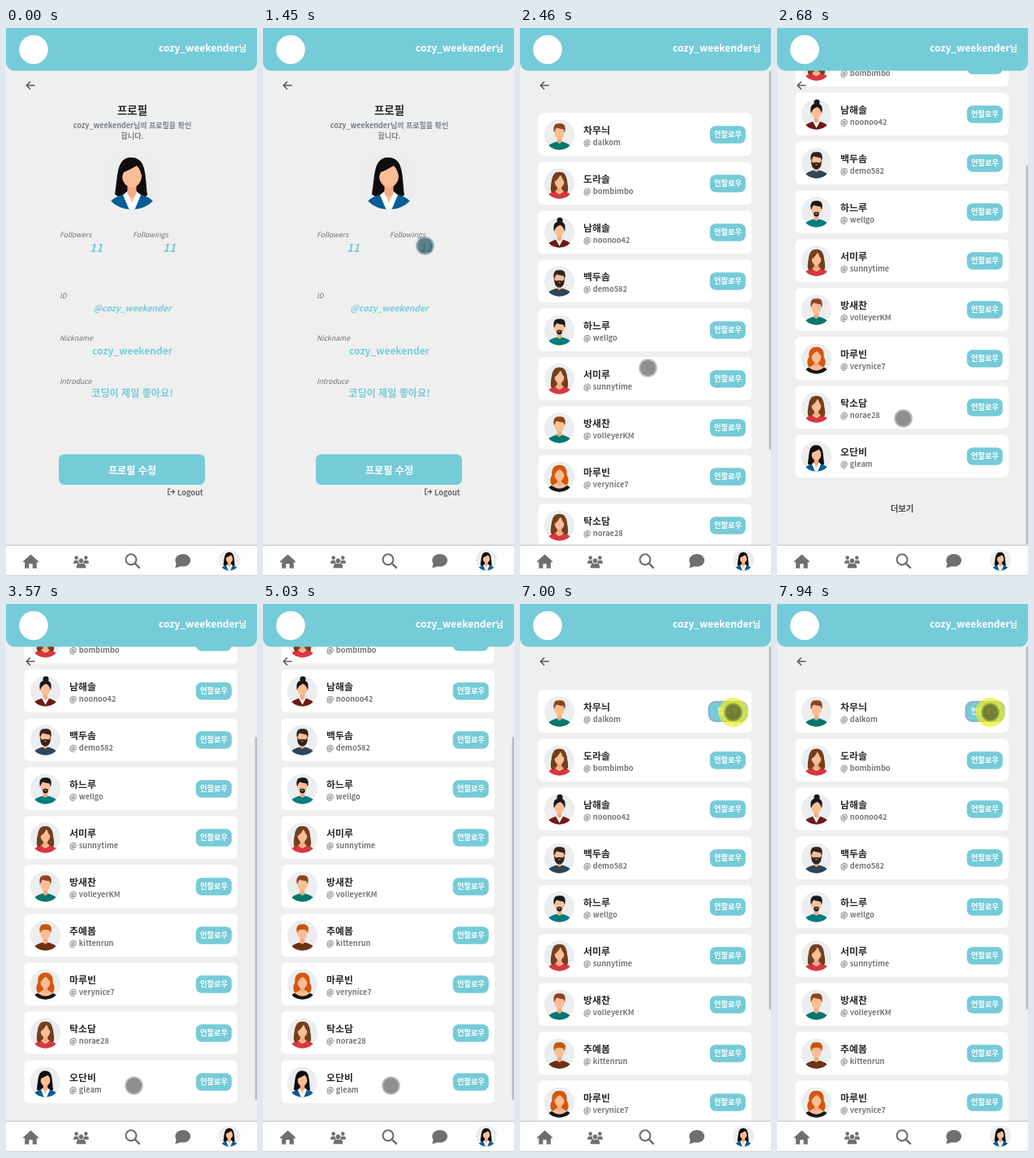
Recreate the animation shown at these times as an HTML page. Size 309 by 673 pixels, loop 8 s.

```html
<!DOCTYPE html>
<html lang="ko">
<head>
<meta charset="utf-8">
<title>Profile and followings</title>
<style>
  html, body { margin: 0; width: 100%; height: 100%; overflow: hidden; background: #efefef; }
  svg { display: block; width: 100%; height: 100%; }
  text { font-family: 'Noto Sans CJK KR', 'Noto Sans KR', 'Noto Sans CJK', 'Noto Sans CJK JP', 'Noto Sans', sans-serif; white-space: pre; }
  .mid { text-anchor: middle; }
  .bold { font-weight: 700; }
  .label { font-size: 8.7px; font-style: italic; fill: #707070; }
  .value { font-weight: 700; fill: #76cbd8; text-anchor: middle; }
  .slant { font-style: italic; }
</style>
</head>
<body>
<svg id="stage" viewBox="0 0 309 673" xmlns="http://www.w3.org/2000/svg"></svg>
<script>
const LOOP = 8000;
const TEAL = '#76cbd8', GREY = '#6f6f6f', SKIN = '#fbbd94', SHADE = '#f3ab82';
const USER = 'cozy_weekender';
const PITCH = 60, FIRST = 105.5, VIEW = 581;

// name, handle, avatar kind; the "late" one arrives with the second load
const people = [
  ['차무늬', 'dalkom', 'man'],
  ['도라솔', 'bombimbo', 'long'],
  ['남해솔', 'noonoo42', 'bun'],
  ['백두솜', 'demo582', 'beard'],
  ['하느루', 'wellgo', 'goatee'],
  ['서미루', 'sunnytime', 'long'],
  ['방새찬', 'volleyerKM', 'man'],
  ['추예봄', 'kittenrun', 'red', 'late'],
  ['마루빈', 'verynice7', 'curly'],
  ['탁소담', 'norae28', 'long'],
  ['오단비', 'gleam', 'bob']
];

const path = (d, fill, more = '') => `<path d="${d}" fill="${fill}" ${more}/>`;
const disc = (x, y, r, fill, more = '') => `<circle cx="${x}" cy="${y}" r="${r}" fill="${fill}" ${more}/>`;
const oval = (x, y, rx, ry, fill) => `<ellipse cx="${x}" cy="${y}" rx="${rx}" ry="${ry}" fill="${fill}"/>`;
const box = (x, y, w, h, r, fill, more = '') =>
  `<rect x="${x}" y="${y}" width="${w}" height="${h}" rx="${r}" fill="${fill}" ${more}/>`;
const text = (x, y, size, str, more = '') => `<text x="${x}" y="${y}" font-size="${size}" ${more}>${str}</text>`;

// Avatars live in a circle of radius 37 around 0,0
const torso = c => path('M-31 40C-29 24 -19 21 -9 18H9C19 21 29 24 31 40Z', c);
const neck = path('M-5.5 4H5.5V18Q0 25 -5.5 18Z', SHADE);
const face = oval(0, -5, 12, 15, SKIN);
const cropped = c => path('M-13 -5C-17 -23 -9 -28 0 -27C12 -29 17 -20 13 -5L10 -13C3 -14 -3 -16 -7 -17L-10 -12Z', c);
const collar = path('M-9 17L0 33L9 17L5 15Q0 23 -5 15Z', '#fff');
const looks = {
  man: torso('#08756b') + path('M-9 18Q0 30 9 18L5 16H-5Z', '#0a8a7d') + neck + face + cropped('#8e451f'),
  red: torso('#6b3215') + neck + face + cropped('#c7560f') + path('M-14 -18Q0 -33 15 -19L13 -10Q0 -19 -12 -10Z', '#c7560f'),
  long: path('M0 -28C-20 -28 -18 -6 -21 10Q-22 23 -13 25H13Q22 23 21 10C18 -6 20 -28 0 -28Z', '#72401f') +
    torso('#d8373f') + path('M-10 18Q0 33 10 18L5 15H-5Z', SKIN) + neck + face +
    path('M3 -23Q-2 -10 -12 -4L-13 22Q-22 24 -21 10C-18 -8 -17 -27 1 -27C17 -27 18 -8 21 10Q22 24 13 22L12 -4Q6 -11 3 -23Z', '#72401f'),
  bun: disc(1, -29, 7, '#17191c') + torso('#6e1b16') + collar + neck + face +
    path('M-13 -2C-17 -21 -9 -26 0 -26C11 -26 17 -20 13 -2Q10 -14 2 -18Q-10 -14 -13 -2Z', '#17191c'),
  beard: torso('#2f4657') + neck + face + cropped('#35221c') +
    path('M-12 -7L-9 -1Q0 -3 9 -1L12 -7C14 8 7 15 0 15S-14 8 -12 -7Z', '#35221c') + path('M-4 3Q0 6 4 3Z', '#fff'),
  goatee: torso('#007d80') + neck + face + cropped('#15191b') +
    path('M-6 1Q0 -2 6 1V8Q0 14 -6 8Z', '#15191b') + path('M-3 3H3V5H-3Z', SKIN),
  curly: path('M0 -28C-18 -28 -19 -12 -18 -4C-24 4 -24 20 -13 23H13C24 20 24 4 18 -4C19 -12 18 -28 0 -28Z', '#d4570f') +
    torso('#141414') + path('M-19 22Q0 36 19 22L6 15H-6Z', SKIN) + neck + face +
    path('M-12 -3Q-14 -23 0 -24Q14 -23 12 -3Q9 -13 1 -18Q-8 -14 -12 -3Z', '#d4570f'),
  bob: path('M-1 -27C-20 -27 -17 -2 -21 18Q-17 23 -11 20H11Q16 23 19 19C16 -2 19 -27 -1 -27Z', '#110c0d') +
    torso('#075d96') + path('M-11 19L-6 15H6L11 19L3 38H-3Z', '#fff') +
    path('M-6 14L0 29L6 14Z', SKIN) + neck + face +
    path('M-13 6C-17 -14 -12 -26 0 -26C14 -26 17 -14 13 6Q13 -10 6 -17Q-4 -11 -10 -9Q-13 -3 -13 6Z', '#110c0d')
};
const avatar = (kind, x, y, r) =>
  `<g transform="translate(${x} ${y}) scale(${r / 37})" clip-path="url(#round)">${disc(0, 0, 37, '#ebedee')}${looks[kind]}</g>`;

const button = (id = '') => box(233.8, 15.8, 44, 21.4, 7, TEAL, id && 'id="followBox"') +
  text(256, 29.8, 9.2, '언팔로우', `class="mid bold" fill="#fff" ${id && 'id="followText"'}`);

const card = ([name, handle, kind], i) => `<g class="card">
  ${box(22.5, 0, 262.5, 52.5, 6, '#fff')}
  ${avatar(kind, 48.5, 26.5, 18.7)}
  ${text(78, 25.2, 11.9, name, 'class="bold" fill="#2a2a2a"')}
  ${text(78, 39.4, 9.2, '@ ' + handle, 'class="bold" fill="#777"')}
  ${i ? '' : box(231.5, 13.5, 49, 26, 9, 'rgba(70,130,150,.6)', 'id="focus"')}
  ${button(i ? '' : 'follow')}</g>`;

const profile = `<g id="profile">
  ${text(155.5, 105.6, 13.4, '프로필', 'class="mid bold" fill="#2a2a2a"')}
  ${text(155.5, 123, 9, USER + '님의 프로필을 확인', 'class="mid bold" fill="#788088"')}
  ${text(155.5, 136, 9, '합니다.', 'class="mid bold" fill="#788088"')}
  ${avatar('bob', 155, 186, 37)}
  ${[['Followers', 66, 257], ['Followings', 156, 257], ['ID', 66, 332], ['Nickname', 66, 384], ['Introduce', 66, 437]]
    .map(([s, x, y]) => `<text class="label" x="${x}" y="${y}">${s}</text>`).join('')}
  ${text(111, 275, 13.6, '11', 'class="value slant"')}
  ${text(201, 275, 13.6, '11', 'class="value slant"')}
  ${text(155.5, 347.6, 10.4, '@' + USER, 'class="value slant"')}
  ${text(155.5, 400.6, 12, USER, 'class="value"')}
  ${text(155.5, 452.6, 12.1, '코딩이 제일 좋아요!', 'class="value"')}
  ${box(65, 523.5, 180, 37.5, 7, TEAL)}
  ${text(155.5, 547.8, 12.1, '프로필 수정', 'class="mid bold" fill="#fff"')}
  ${path('M202.5 566H199.7V573H202.5M202 569.5H207.3M205 567L207.5 569.5L205 572', 'none', 'stroke="#555" stroke-width="1.1"')}
  ${text(211, 574, 9.2, 'Logout', 'class="bold" fill="#666"')}
</g>`;

const list = `<g id="list"><g id="scroller">${people.map(card).join('')}
  ${text(154, 739.8, 10.4, '더보기', 'id="more" class="mid bold" fill="#444"')}</g>
  ${box(306.6, 52, 2.4, 100, 1.2, '#b9b9b9', 'id="thumb"')}</g>`;

const header = path('M0 0H309V42.5a10 10 0 0 1-10 10H10A10 10 0 0 1 0 42.5Z', TEAL) +
  disc(34, 26.5, 17.8, '#fff', 'id="logo"') +
  text(296, 28.6, 12, `${USER}<tspan font-size="10">님</tspan>`, 'class="bold" text-anchor="end" fill="#fff"') +
  path('M35.5 70.5H25.5M30 65.8L25.3 70.5L30 75.2', 'none', 'stroke="#555" stroke-width="1.5"');

// Head, then shoulders of half width w and height h below it
const person = (x, y, r, w, h) => disc(x, y, r, GREY) +
  path(`M${x - w} ${y + r + .8 + h}q0 ${-h} ${w * .6} ${-h}h${w * .8}q${w * .6} 0 ${w * .6} ${h}Z`, GREY);
const nav = box(0, 635, 309, 38, 0, '#fdfdfd') + box(0, 634.5, 309, 1.5, 0, '#cfcfcf') + box(0, 671.8, 309, 1.2, 0, '#d5d5d5') +
  path('M30.5 646.5L40.3 655.3L39 656.6L37.8 655.6V663.5H32.7V658H28.3V663.5H23.2V655.6L22 656.6L20.7 655.3Z', GREY) +
  person(86.7, 650.6, 2.3, 3.6, 4) + person(98.3, 650.6, 2.3, 3.6, 4) +
  disc(92.5, 654.2, 3.7, '#fdfdfd') + person(92.5, 654.2, 2.8, 5.8, 5.4) +
  `<circle cx="154" cy="652.7" r="6.4" fill="none" stroke="${GREY}" stroke-width="2.1"/>` +
  path('M158.6 657.3L164 662.7', 'none', `stroke="${GREY}" stroke-width="2.5" stroke-linecap="round"`) +
  oval(217.7, 653.8, 9.4, 7.8, GREY) + path('M210 656L208.4 663Q213 662.8 216 660Z', GREY) +
  avatar('bob', 275, 653.3, 13);

const stage = document.getElementById('stage');
stage.innerHTML = `<defs><clipPath id="round"><circle r="37"/></clipPath></defs>
  ${box(0, 0, 309, 673, 0, '#efefef')}${profile}${list}${header}${nav}
  <g id="cursor">${disc(0, 0, 18, '#eeee1e', 'id="press" opacity=".68"')}
  <g id="dot">${disc(0, 0, 11.3, 'inherit', 'id="rim"')}${disc(0, 0, 9.4, 'inherit', 'id="core"')}</g></g>`;

const $ = id => document.getElementById(id);
const show = (node, on) => node.setAttribute('display', on ? 'inline' : 'none');
const within = (t, a, b) => t >= a && t < b;
const cards = [...document.querySelectorAll('.card')];

// Eased value between keys of the form [time, value, value...]
function track(keys, t) {
  if (t <= keys[0][0]) return keys[0].slice(1);
  for (let i = 1; i < keys.length; i++) {
    const a = keys[i - 1], b = keys[i];
    if (t < b[0]) {
      const u = (t - a[0]) / (b[0] - a[0]), e = u * u * (3 - 2 * u);
      return a.slice(1).map((v, k) => v + (b[k + 1] - v) * e);
    }
  }
  return keys[keys.length - 1].slice(1);
}

const pointer = [[460, 287, 642], [1050, 199.5, 267.5], [2260, 199.5, 267.5], [2460, 157.5, 417.5],
  [2680, 155.5, 479.5], [2940, 157.5, 591.5], [5030, 157.5, 591.5], [5540, 262.5, 133]];
const scrolling = [[2300, 0], [2460, 1], [2680, 146], [2940, 145], [5050, 145], [5420, 0]];
const presses = [1310, 3090, 6000, 7000, 7940];

function draw(t) {
  const full = t >= 3440;
  show($('profile'), t < 1520);
  show($('list'), t >= 1660);
  show($('logo'), !within(t, 1520, 1590));

  const [scroll] = track(scrolling, t);
  $('scroller').setAttribute('transform', `translate(0 ${-scroll})`);
  let row = 0;
  people.forEach((p, i) => {
    const on = full || p[3] !== 'late';
    show(cards[i], on);
    if (on) cards[i].setAttribute('transform', `translate(0 ${FIRST + PITCH * row++})`);
  });
  show($('more'), !full);
  const content = full ? 757 : 726;
  $('thumb').setAttribute('y', 52 + scroll * VIEW / content);
  $('thumb').setAttribute('height', VIEW * VIEW / content);

  show($('focus'), t >= 6070);
  $('followText').textContent = within(t, 6200, 7210) ? '팔로우' : '언팔로우';
  $('followBox').setAttribute('fill', within(t, 6070, 6140) || within(t, 7070, 7140) ? '#69b9c5' : TEAL);

  const [x, y] = track(pointer, t);
  show($('cursor'), t >= 460);
  $('cursor').setAttribute('transform', `translate(${x} ${y})`);
  show($('press'), presses.some(p => within(t, p, p + 140)));
  const hover = within(t, 1050, 1520);
  $('dot').setAttribute('fill', hover ? '#144652' : '#000');
  $('rim').setAttribute('fill-opacity', hover ? .38 : .27);
  $('core').setAttribute('fill-opacity', hover ? .45 : .23);
}

const start = performance.now();
function tick() {
  draw((performance.now() - start) % LOOP);
  requestAnimationFrame(tick);
}
tick();
</script>
</body>
</html>
```
